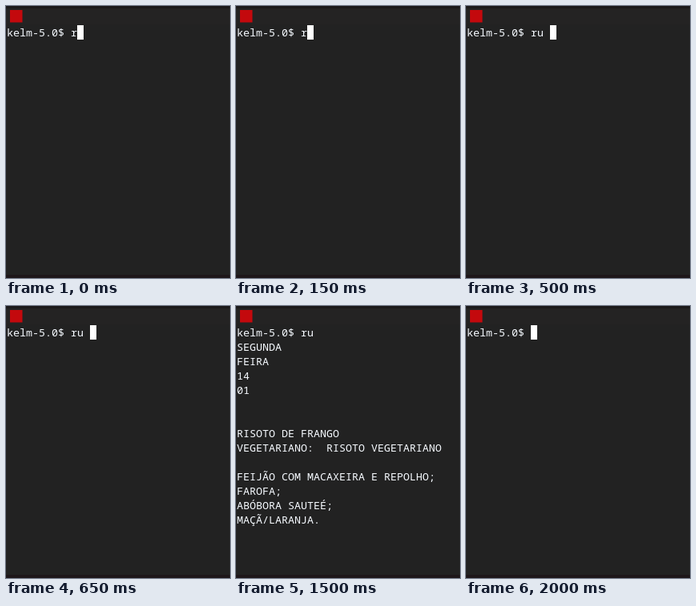
An HTML page that plays this animation: 280 px wide and 340 px high, repeating every 2250 ms.

```html
<!DOCTYPE html>
<html lang="pt">
<head>
<meta charset="utf-8">
<title>Terminal</title>
<style>
  html, body { margin: 0; width: 100%; height: 100%; overflow: hidden; background: #222; }
  svg { display: block; width: 100vw; height: 100vh; }
  text {
    font: 13.333px "Noto Sans Mono", "DejaVu Sans Mono", monospace;
    fill: #f6faff;
    white-space: pre;
  }
</style>
</head>
<body>
<svg viewBox="0 0 280 340">
  <rect width="280" height="340" fill="#222"/>
  <rect width="280" height="3" fill="#1c1a1b"/>
  <rect y="3" width="280" height="20" fill="#242323"/>
  <rect x="5" y="5" width="15.5" height="15.5" fill="#c3090d"/>
  <rect y="336" width="280" height="4" fill="#1e171a"/>
  <g id="screen"></g>
  <rect id="cursor" y="24" width="8" height="18" fill="#fff"/>
</svg>
<script>
const LOOP = 2250, LEFT = 1, CELL = 8, BASELINE = 38, PITCH = 18;
const PROMPT = "kelm-5.0$ ";
const MENU = [
  "SEGUNDA", "FEIRA", "14", "01", "", "",
  "RISOTO DE FRANGO",
  "VEGETARIANO:  RISOTO VEGETARIANO",
  "",
  "FEIJÃO COM MACAXEIRA E REPOLHO;",
  "FAROFA;",
  "ABÓBORA SAUTEÉ;",
  "MAÇÃ/LARANJA."
];
const STEPS = [
  { at: 0, typed: "r" },
  { at: 250, typed: "ru" },
  { at: 500, typed: "ru " },
  { at: 750, typed: "ru", output: true },
  { at: 2000, typed: "" }
];

const screen = document.getElementById("screen");
const cursor = document.getElementById("cursor");

function addLine(parent, string, row) {
  const line = document.createElementNS("http://www.w3.org/2000/svg", "text");
  line.setAttribute("x", LEFT);
  line.setAttribute("y", BASELINE + row * PITCH);
  line.textContent = string;
  parent.append(line);
  return line;
}

const command = addLine(screen, PROMPT, 0);
const output = MENU.map((string, i) => addLine(screen, string, i + 1));
let shown;

function render(time) {
  const t = time % LOOP;
  const step = STEPS.findLast(s => t >= s.at);
  if (step === shown) return;
  shown = step;
  const string = PROMPT + step.typed;
  command.textContent = string;
  cursor.setAttribute("x", LEFT + string.length * CELL);
  cursor.style.display = step.output ? "none" : "";
  for (const line of output) line.style.display = step.output ? "" : "none";
}

const start = performance.now();
function tick() {
  render(performance.now() - start);
  requestAnimationFrame(tick);
}
tick();
</script>
</body>
</html>
```
